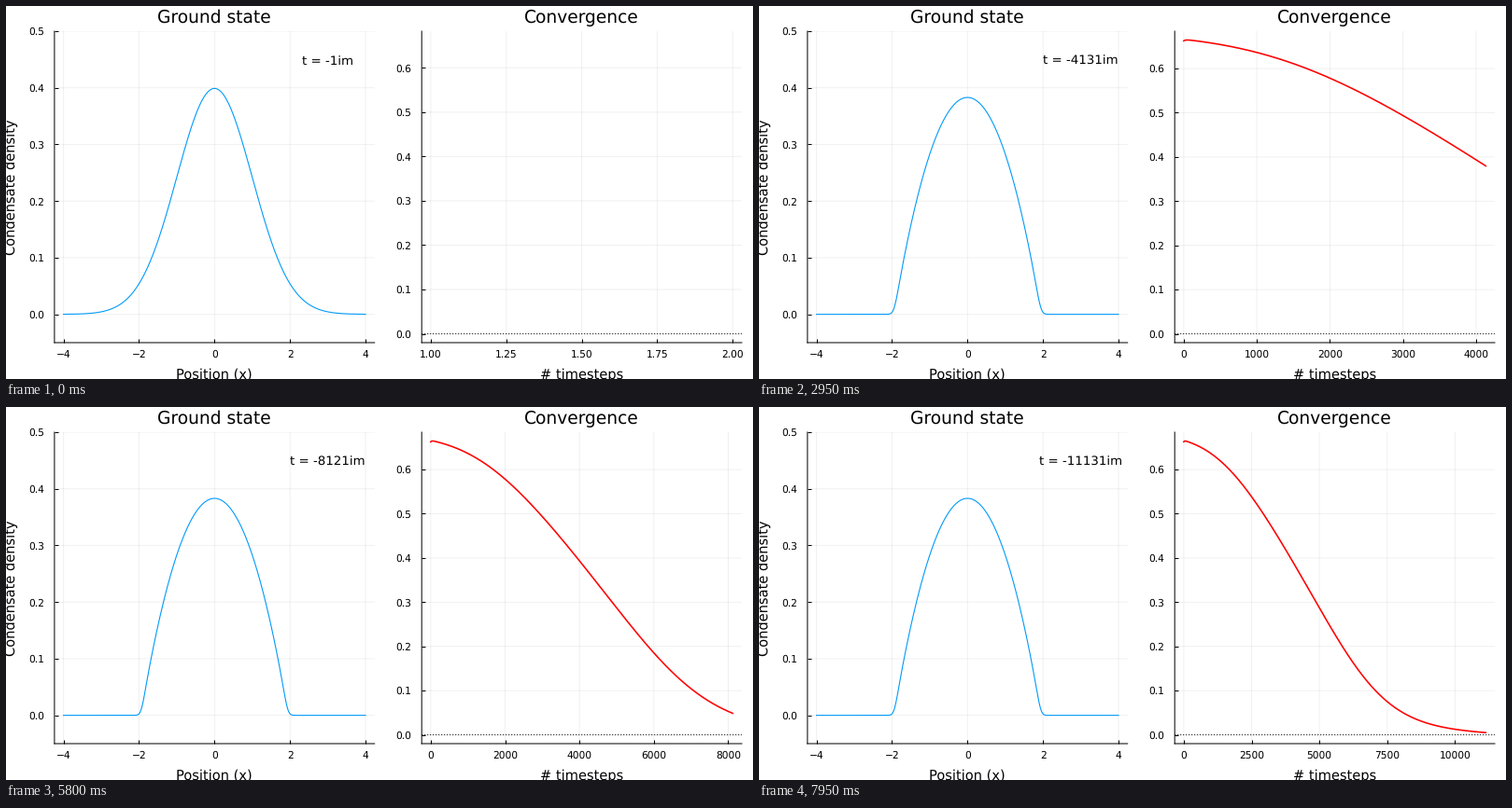
Write a matplotlib script that moves like this. It is 800x400 px and loops after 8 s.

```python
import numpy as np
import matplotlib.pyplot as plt
from matplotlib.animation import FuncAnimation

W, H, DPI = 800, 400, 100
PX = 72 / DPI                      # one pixel in points
FRAMES, INTERVAL, STRIDE = 160, 50, 70

plt.rcParams["font.family"] = "DejaVu Sans"
plt.rcParams["text.hinting"] = "none"
plt.rcParams["path.snap"] = False


def condensate():
    """Imaginary-time relaxation of a trapped condensate, one density per frame."""
    x = np.linspace(-4, 4, 512)
    dx = x[1] - x[0]
    k = 2 * np.pi * np.fft.fftfreq(x.size, dx)
    g, kinetic, sub = 5.0, 8e-4, 10
    dt = 0.0028 * STRIDE / sub
    spread = np.exp(-kinetic * k**2 * dt)
    psi = np.exp(-x**2 / 4) / (2 * np.pi) ** 0.25
    states = [psi**2]
    for _ in range(FRAMES - 1):
        for _ in range(sub):
            psi = np.fft.ifft(np.fft.fft(psi) * spread).real
            psi *= np.exp(-dt * (x**2 / 2 + g * psi**2))
            psi /= np.sqrt(np.sum(psi**2) * dx)
        states.append(psi**2)
    return x, states


def convergence():
    """Sigmoid decay with a short initial rise."""
    top = 0.69
    t = np.array([0, 500, 1000, 1500, 2000, 3000, 4000, 5000, 6000,
                  7000, 8000, 9311, 10000, 11131]) / 1e4
    v = np.array([.6655, .655, .6365, .611, .578, .494, .393, .2878, .1845,
                  .1045, .0535, .0202, .0123, .0053])
    # weights turn logit errors into errors of the value itself
    fit = np.polyfit(t, np.log(v / (top - v)), 6, w=v * (top - v))
    step = np.arange(1, STRIDE * (FRAMES - 1) + 2)
    curve = top / (1 + np.exp(-np.polyval(fit, step / 1e4)))
    return step, curve - 0.0034 * np.exp(-step / 25)


def nice_ticks(lo, hi):
    """Pick 4 to 8 round ticks, weighing count, coverage and roundness."""
    span = hi - lo
    options = []
    for power in range(int(np.floor(np.log10(span))) - 1,
                       int(np.ceil(np.log10(span))) + 1):
        for q, rank in ((1, 1), (5, .9), (2, .7), (2.5, .5), (3, .2)):
            d = q * 10.0**power
            ticks = np.arange(np.ceil(lo / d), np.floor(hi / d) + 1) * d + 0.0
            n = len(ticks)
            if 4 <= n <= 8:
                score = (0.25 * (1 - abs(n - 5) / 5) + 0.25 * rank
                         + 0.5 * span / (ticks[-1] - ticks[0]))
                options.append((round(score, 9), -n, list(ticks)))
    return max(options)[2]


def text(x, y, s, px, **kw):
    return fig.text(x / W, 1 - y / H, s, fontsize=px * PX, ha="center",
                    va="baseline", color="black", **kw)


def panel(left, title, xlabel):
    top, bottom, width = 27, 361, 342.8
    ax = fig.add_axes([left / W, 1 - bottom / H, width / W, (bottom - top) / H])
    ax.patch.set_visible(False)
    ax.spines[["top", "right"]].set_visible(False)
    ax.spines[["left", "bottom"]].set_linewidth(PX)
    ax.set_axisbelow(True)
    ax.grid(True, color="black", alpha=0.06, lw=PX)
    ax.tick_params(direction="in", length=4 * PX, width=PX,
                   labelsize=10.67 * PX)
    ax.tick_params(axis="x", pad=7.5 * PX)
    ax.tick_params(axis="y", pad=10.5 * PX)
    mid = left + width / 2
    text(mid, 18, title, 18.67)
    text(mid, 400, xlabel, 14.67)
    return ax


fig = plt.figure(figsize=(W / DPI, H / DPI), dpi=DPI, facecolor="white")
x, density = condensate()
steps, error = convergence()

ax1 = panel(51.9, "Ground state", "Position (x)")
ax1.set_xlim(-4.24, 4.24)
ax1.set_ylim(-0.05, 0.5)
ax1.set_xticks([-4, -2, 0, 2, 4])
ax1.set_yticks(np.arange(6) / 10)
wave, = ax1.plot([], [], color="#009afa", lw=1.1 * PX)
text(10, 194, "Condensate density", 14.67, rotation=90, rotation_mode="anchor")
clock = text(344.7, 63, "", 13.33)

ax2 = panel(445.2, "Convergence", "# timesteps")
ax2.set_yticks(np.arange(7) / 10)
ax2.axhline(0, color="black", lw=PX, ls=(0, (1, 2)))
trace, = ax2.plot([], [], color="red", lw=1.6 * PX)


def update(i):
    t = STRIDE * i + 1
    wave.set_data(x, density[i])
    clock.set_text(f"t = -{t}im")
    trace.set_data(steps[:t], error[:t])

    last = max(t, 2)
    pad = 0.03 * (last - 1)
    lo, hi = 1 - pad, last + pad
    ticks = nice_ticks(lo, hi)
    ax2.set_xlim(lo, hi)
    ax2.set_xticks(ticks, [f"{v:.0f}" if i else f"{v:.2f}" for v in ticks])
    peak = error[:t].max()
    ax2.set_ylim(-0.03 * peak, 1.03 * peak)
    return wave, clock, trace


anim = FuncAnimation(fig, update, frames=FRAMES, interval=INTERVAL,
                     repeat=True, repeat_delay=0, blit=False)
plt.show()
```
